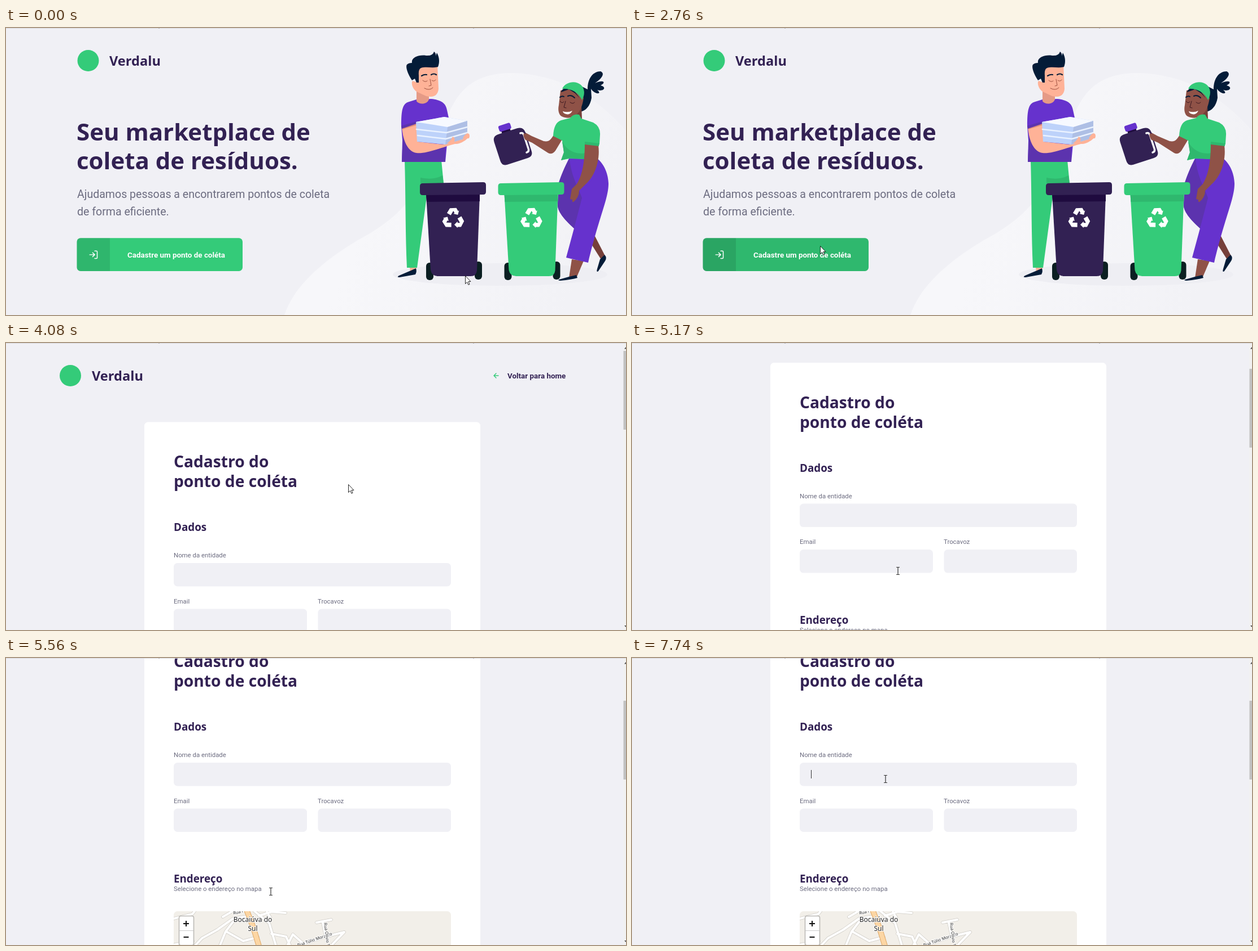
These frames come from a looping animation (1098 px wide and 510 px high, 8000 ms). An HTML page:

```html
<!DOCTYPE html>
<html lang="pt-BR">
<head>
<meta charset="utf-8">
<title>Coleta de resíduos</title>
<style>
html, body { margin: 0; height: 100%; overflow: hidden; background: #f0f0f5 }
svg { display: block; width: 1098px; height: 510px }
text { font-family: Roboto, sans-serif; fill: #6c6c80 }
.title { font-family: "Open Sans", sans-serif; font-weight: 700; fill: #322153 }
.bold { font-weight: 700 }
.label { font-size: 11.4px }
.map text { font-family: "Noto Sans", sans-serif; font-size: 7.5px; fill: #222; stroke: #fff; stroke-width: 2px; paint-order: stroke }
.map .city { font-size: 12px }
.line { fill: none; stroke-linecap: round; stroke-linejoin: round }
.green { fill: #34cb79 } .moss { fill: #2fb86e }
.violet { fill: #6632cd } .grape { fill: #5c33ae }
.plum { fill: #322153 } .ink { fill: #1f0b3f }
.navy { fill: #041c38 } .tyre { fill: #0b1f22 }
.pale { fill: #ffb297 } .brown { fill: #8f5247 } .umber { fill: #76403a }
</style>
</head>
<body>
<svg viewBox="0 0 1098 510">
<defs>
  <linearGradient id="fade" gradientUnits="userSpaceOnUse" x1="640" y1="330" x2="1000" y2="480">
    <stop offset="0" stop-color="#f7f7fa"/><stop offset="1" stop-color="#f2f2f6"/>
  </linearGradient>
  <clipPath id="mapBox"><rect x="297" y="655" width="491" height="280" rx="6.5"/></clipPath>
  <path id="chaser" d="M2 11 8 5V7.500H12.500L8-.6 15-4.600 20 4.500 14.500 15H8V17z"/>
  <g id="recycle" fill="#fff" transform="translate(0 2) scale(.96)">
    <use href="#chaser"/>
    <use href="#chaser" transform="rotate(120)"/>
    <use href="#chaser" transform="rotate(240)"/>
  </g>
  <g id="bin">
    <rect class="tyre" x="744" y="417" width="13" height="31" rx="6"/>
    <rect class="tyre" x="830" y="415" width="13" height="32" rx="6"/>
    <path d="M744 295H839L834 431Q833 441 823 441H765Q754 441 752 430z"/>
    <path d="M744 296H839V308L745 309z" fill="var(--shade)"/>
    <path d="M738 276 845 274Q850 274 850 279V291Q850 296 845 296L738 297Q733 297 733 292V281Q733 276 738 276z"/>
    <use href="#recycle" x="792" y="337"/>
  </g>
  <g id="roads">
    <path d="M297 668 330 660 334 655M299 714 331 708M333 718 347 703 374 688 402 668 427 664M384 665 401 655M378 718 389 691 402 674M390 691 420 708 446 701M440 655 466 676 478 716M448 663 470 656 495 658M462 656 468 666M470 695 496 700 504 718M497 718 508 696 527 713 566 700 599 692M550 675 576 670M566 700 561 675M599 692 574 718"/>
  </g>
</defs>

<g id="home">
  <path d="M493 510C511 455 570 407 632 372C690 340 726 302 752 240C771 188 783 132 818 103C850 77 899 75 951 87C1008 100 1059 138 1098 182V510z" fill="url(#fade)"/>
  <circle class="green" cx="145.500" cy="58" r="19"/>
  <text class="title" x="183" y="67" font-size="23.6">Verdalu</text>
  <g font-size="42">
    <text class="title" x="125" y="200">Seu marketplace de</text>
    <text class="title" x="125" y="250.500">coleta de resíduos.</text>
  </g>
  <g font-size="19.56">
    <text x="126" y="301.500">Ajudamos pessoas a encontrarem pontos de coleta</text>
    <text x="126" y="332.500">de forma eficiente.</text>
  </g>
  <rect id="button" x="125.500" y="373.300" width="293.500" height="58.700" rx="6.5"/>
  <path d="M184 373.300H132Q125.500 373.300 125.500 379.800V425.500Q125.500 432 132 432H184z" opacity=".1"/>
  <path class="line" d="M15 3h4a2 2 0 0 1 2 2v14a2 2 0 0 1-2 2h-4M10 17l5-5-5-5M15 12H3" transform="translate(146 394) scale(.74)" stroke="#fff" stroke-width="2"/>
  <text class="bold" x="301.500" y="407.500" font-size="13.4" text-anchor="middle" style="fill:#fff">Cadastre um ponto de coléta</text>

  <ellipse cx="875" cy="438" rx="190" ry="20" fill="#eeeef3"/>

  <g id="man">
    <path class="green" d="M706 235H771L775 276 768 300H745L728 426H710C707 360 708 300 706 235z"/>
    <path class="moss" d="M734 266Q757 271 773 262L775 276H734z"/>
    <path class="pale" d="M715 426H727L724 434H716z"/>
    <path class="navy" d="M717 431 726 427Q728 433 725 438L697 443Q691 443 696 440z"/>
    <path class="violet" d="M727 127 753 126C772 128 779 134 781 146L785 164 778 238H701L702 200 700 174C700 146 702 134 714 131z"/>
    <path class="grape" d="M703 190C712 220 725 224 778 207V238H701z"/>
    <path d="M727 112H749V127C745 137 731 136 727 130z" fill="#e59a86"/>
    <path class="pale" d="M727 68 764 64 766 108C765 121 755 124 744 121L727 113C720 108 717 98 720 94L727 96z"/>
    <path class="navy" d="M727 97 724 90 719 93C712 83 707 69 710 65Q713 62 719 62C717 52 732 47 744 49Q756 50 758 42Q762 45 761 50L763 44C769 54 767 64 765 69C755 72 745 68 735 71Q730 73 731 84V97z"/>
    <path class="line" d="M738 93q4 4 8 1M754 93q4 3 7-1M741 107q9 5 15-1M751 91l2 11-4 1" stroke="#9d5140"/>
    <path class="line" d="M736 85q5-3 9-2M753 83q5-3 9 0" stroke="#041c38" stroke-width="2.200"/>
    <path class="pale" d="M701 176 727 169 729 202 774 207 790 200C797 194 818 185 820 188C824 194 806 207 795 206C775 211 744 224 727 222C712 220 703 201 701 176z"/>
    <path d="M701 175 726 168V173L702 180z" fill="#de8e78"/>
    <path class="grape" d="M700 174 727 166V170L701 179z"/>
    <path d="M726 167 776 158 817 165V195L778 207 728 202z" fill="#bdd2fa"/>
    <path d="M726 167 776 158 817 165 782 176z" fill="#f6f9ff"/>
    <path d="M782 176 817 165V195L778 207z" fill="#aebfe5"/>
    <path class="line" d="M727 180 780 186 817 176M729 191 779 197 817 186" stroke="#eaf2ff" stroke-width="2.500"/>
    <path class="pale" d="M781 205Q788 200 791 193Q797 195 793 205zM809 197Q811 190 817 187Q823 190 820 196z"/>
  </g>

  <g id="woman">
    <path class="umber" d="M1042 368 1061 405 1053 410 1036 383z"/>
    <path class="navy" d="M1060 403Q1065 408 1061 414L1049 432Q1045 435 1047 428L1052 411z"/>
    <path class="brown" d="M1002 411 1023 414 1011 442 997 444z"/>
    <path class="navy" d="M1010 439 1012 444Q1002 447 982 449Q974 448 983 446L997 442z"/>
    <path class="violet" d="M999 228 1045 230C1059 241 1066 257 1067 276C1067 304 1051 333 1031 417L992 408 1006 356C987 339 977 325 977 315L979 275C984 259 991 244 999 228z"/>
    <path class="grape" d="M998 232C1001 264 1013 282 1020 302L1006 356C987 339 977 325 977 315L979 275C984 259 991 244 998 232z"/>
    <path class="navy" d="M1030 109C1030 89 1040 77 1053 77C1062 81 1054 91 1043 98C1059 91 1063 97 1053 102C1065 105 1058 114 1047 110C1057 118 1043 119 1036 108L1037 124C1034 143 1022 151 1009 149L1018 103z"/>
    <path class="umber" d="M1001 146 1019 137 1020 161 1000 164z"/>
    <path class="brown" d="M982 111 1005 106 1023 124C1021 138 1017 147 1013 151C1005 160 995 162 984 157C979 154 977 146 979 137z"/>
    <path class="navy" d="M983 114C985 106 994 105 1004 108L1016 125 1008 116 997 109z"/>
    <path class="green" d="M985 108C991 95 1009 93 1018 101C1026 108 1025 120 1020 128C1015 117 1004 107 985 108z"/>
    <path class="line" d="M981 130q4 5 7 1M999 132q5 4 8 0M991 130l-3 11 4 1" stroke="#3a1820"/>
    <path class="line" d="M981 123q4-3 7-1M995 121q6-3 12 3" stroke="#041c38" stroke-width="2"/>
    <path d="M986 148Q995 151 1003 147Q999 155 992 153Q987 152 986 148z" fill="#fff"/>
    <path class="brown" d="M971 188C965 199 961 203 952 201L931 192 920 186Q915 186 917 190L921 199 932 204 960 222Q967 226 973 218L985 198z"/>
    <path class="green" d="M999 160Q1005 152 1015 154L1019 161 1040 168Q1053 175 1052 190L1051 206 1046 218 1044 234 998 232 983 235 988 221 985 200 969 192C970 176 974 167 983 164z"/>
    <path class="moss" d="M985 202C995 221 1014 225 1026 222L1024 233 998 231 983 235 988 221z"/>
    <path class="brown" d="M1025 204 1049 208C1053 238 1041 265 1027 277L1015 289Q1015 301 1005 309Q1002 310 1003 305L999 304 1002 286 1011 277C1021 260 1025 238 1025 204z"/>
    <path class="moss" d="M1025 202 1050 205V210L1025 207z"/>
  </g>

  <use href="#bin" class="plum" style="--shade:#1f0b3f"/>
  <use href="#bin" class="green" x="138.500" style="--shade:#2fb86e"/>

  <g transform="translate(896.500 210.500) rotate(-18)">
    <rect class="ink" x="-10" y="-35" width="16" height="12"/>
    <rect class="violet" x="-13" y="-42" width="22" height="11" rx="3"/>
    <path class="plum" d="M-17-28H18Q30-28 30-16V18Q30 28 20 28H-18Q-28 28-28 18V-17Q-28-28-17-28z"/>
    <path class="line" d="M21-18Q26-18 26-12V13Q26 18 21 18" stroke="#f6f6fa" stroke-width="3.500"/>
  </g>
  <path class="brown" d="M917 187 927 190 930 202 920 199Q915 192 917 187z"/>

  <g id="status">
    <path d="M-1 494.500H114Q117.500 494.500 117.500 498V511H-1z" fill="#f2f2f4" stroke="#d4d4d8"/>
    <text x="3" y="506.500" font-size="9">localhost:3000/create-point</text>
  </g>
</g>

<g id="form">
  <g id="page">
    <circle class="green" cx="114" cy="58" r="19"/>
    <text class="title" x="152" y="67" font-size="23.6">Verdalu</text>
    <path class="line" d="M872 58H864.500M868 54l-4 4 4 4" stroke="#34cb79" stroke-width="1.400"/>
    <text class="bold" x="888" y="63" font-size="13.4" style="fill:#322153">Voltar para home</text>
    <rect x="245" y="140.500" width="595" height="900" rx="6.5" fill="#fff"/>
    <g font-size="28.2">
      <text class="title" x="297" y="221">Cadastro do</text>
      <text class="title" x="297" y="256">ponto de coléta</text>
    </g>
    <text class="title" x="297" y="334" font-size="18.8">Dados</text>
    <g class="label">
      <text x="297" y="381">Nome da entidade</text>
      <text x="297" y="462.500">Email</text>
      <text x="552" y="462.500">Trocavoz</text>
      <text x="297" y="619">Selecione o endereço no mapa</text>
    </g>
    <g fill="#f0f0f5">
      <rect x="297" y="391" width="491" height="41.500" rx="6.5"/>
      <rect x="297" y="472.500" width="236" height="41.500" rx="6.5"/>
      <rect x="552.500" y="472.500" width="235.500" height="41.500" rx="6.5"/>
    </g>
    <rect id="caret" x="317" y="404" width="1" height="15" fill="#333"/>
    <text class="title" x="297" y="604" font-size="18.8">Endereço</text>
    <g class="map" clip-path="url(#mapBox)">
      <rect x="297" y="655" width="491" height="280" fill="#f2efe9"/>
      <use href="#roads" class="line" stroke="#cfccc6" stroke-width="5.500"/>
      <use href="#roads" class="line" stroke="#fff" stroke-width="4"/>
      <g class="line">
        <path d="M425 650 438 684 449 720" stroke="#dfa766" stroke-width="10"/>
        <path d="M425 650 438 684 449 720" stroke="#fcd6a4" stroke-width="8"/>
      </g>
      <text transform="translate(403 661) rotate(-13)">Rua F</text>
      <text transform="translate(517 718) rotate(-19)">Rua Túlio Moranto</text>
      <text transform="translate(563 676) rotate(83)">Rua Olívio Tamer</text>
      <g text-anchor="middle">
        <text class="city" x="437" y="674">Bocaiúva do</text>
        <text class="city" x="437" y="690">Sul</text>
      </g>
      <rect x="306.500" y="663.500" width="26" height="52" rx="3" fill="#fff" stroke="#bbb9b5" stroke-width="1.600"/>
      <path d="M307 689.500H332" stroke="#ccc"/>
      <path d="M314 677H324M319 672V682M314.500 701H323.500" stroke="#111" stroke-width="2"/>
    </g>
  </g>
  <rect x="1093" width="5" height="510" fill="#f1f1f1"/>
  <rect id="thumb" x="1093.500" width="5" fill="#c1c1c1"/>
  <path d="M1095 10.500 1098 7V10.500zM1095 502 1098 505V502z" fill="#444"/>
</g>

<rect width="1098" height="1" fill="#dadade"/>
<path d="M270 0h2v1h-2zM827 0h2v1h-2z" fill="#a9a9b0"/>
<path id="arrow" d="M.5.500V14.500L3.700 11.500 5.900 16.300 8 15.400 5.900 10.600H10z" fill="#fff" stroke="#111" stroke-width=".9"/>
<path id="beam" class="line" d="M-2.500-6.500H2.500M0-6.500V6.500M-2.500 6.500H2.500" stroke="#333" stroke-width="1.200"/>
</svg>
<script>
const LOOP = 8000;
const $ = id => document.getElementById(id);
const show = (id, on) => $(id).setAttribute('visibility', on ? 'inherit' : 'hidden');
const set = (id, name, value) => $(id).setAttribute(name, value);
const smooth = p => p * p * (3 - 2 * p);

// Progress in n jumps, the first at t0 and the last at t1.
const steps = (t, t0, t1, n) =>
  t < t0 ? 0 : Math.min(n, Math.floor((t - t0) / (t1 - t0) * (n - 1) + 1)) / n;

// Pointer moves: start, end, jumps, from x, y, to x, y
const moves = [
  [560, 740, 4, 813, 440, 504, 390],
  [1520, 1910, 6, 509, 393, 333, 387],
  [2850, 3150, 5, 333, 387, 606, 251],
  [4390, 4620, 4, 606, 251, 477, 398],
  [4760, 5400, 9, 477, 398, 469, 408],
  [5480, 5560, 2, 469, 408, 469, 415],
  [5640, 6170, 8, 469, 415, 450, 219],
  [6420, 6490, 2, 450, 219, 449, 215]
];

function pointer(t) {
  const move = moves.filter(m => t >= m[0]).pop();
  if (!move) return [813, 440];
  const [t0, t1, n, x0, y0, x1, y1] = move;
  const p = smooth(steps(t, t0, t1, n));
  return [x0 + (x1 - x0) * p, y0 + (y1 - y0) * p].map(Math.round);
}

function draw(t) {
  const onForm = t >= 2850;
  show('home', !onForm);
  show('form', onForm);

  const hover = steps(t, 1754, 1910, 3);
  const tint = [[52, 47], [203, 184], [121, 110]].map(([a, b]) => a + (b - a) * hover);
  set('button', 'fill', `rgb(${tint})`);
  set('status', 'opacity', t < 2140 ? 0 : 1 - steps(t, 2380, 2530, 3));

  const scroll = 205 * steps(t, 4760, 5560, 12) ** .96;
  set('page', 'transform', `translate(0 ${-scroll})`);
  set('thumb', 'y', 14 + scroll * .302);
  set('thumb', 'height', t < 4080 ? 173 : 140);
  show('caret', onForm && (t >= 6660 && t < 7190 || t >= 7740));

  const typing = t >= 4620;
  show('arrow', !typing);
  show('beam', typing);
  set(typing ? 'beam' : 'arrow', 'transform', `translate(${pointer(t)})`);
}

const start = performance.now();
function tick() {
  draw((performance.now() - start) % LOOP);
  requestAnimationFrame(tick);
}
tick();
</script>
</body>
</html>
```
